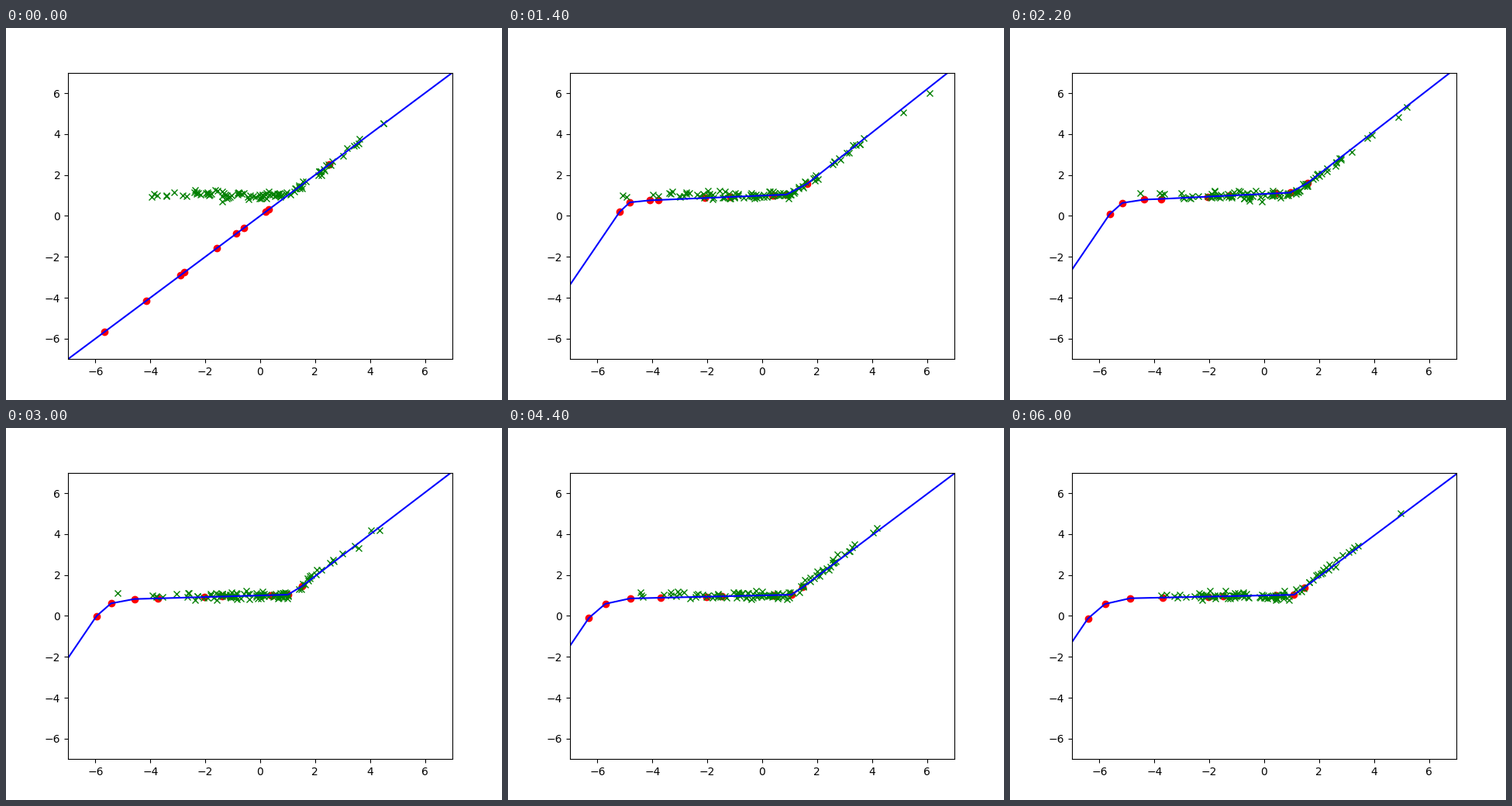
A matplotlib script for the animation above (6.2 s loop, 640 by 480 pixels).

```python
import numpy as np
import matplotlib.pyplot as plt
from matplotlib.animation import FuncAnimation

FRAMES, STEP_MS = 31, 200
SETTLED, LAST = 7, FRAMES - 1
LIMIT = 7
BATCH = 100

# Knot positions at the start, once the bend is learnt, and at the end
KNOTS = np.array([
    [-5.67, -4.14, -2.90, -2.76, -1.58, -0.87, -0.59, 0.20, 0.32, 2.52],
    [-5.19, -4.82, -4.08, -3.77, -2.09, -1.15, 0.38, 0.42, 0.88, 1.65],
    [-6.42, -5.80, -4.88, -3.70, -2.02, -1.50, 0.41, 0.43, 1.08, 1.46],
])

# Heights at the left edge, knots 1, 2, 3, 9, 10 and the right edge
ANCHORS = [0, 1, 2, 3, 9, 10, 11]
BENT = np.array([-3.37, 0.20, 0.66, 0.76, 1.04, 1.58, 7.25])
FINAL = np.array([-1.28, -0.13, 0.58, 0.86, 1.03, 1.38, 6.93])


def ease_out(u, power):
    return 1 - (1 - u) ** power


def mix(a, b, u):
    return a + (b - a) * u


def with_edges(x):
    return np.concatenate([[-LIMIT], x, [LIMIT]])


def fit(step):
    """Piecewise linear curve, from the identity to a flat part and a ramp."""
    if step < SETTLED:
        u = ease_out(step / SETTLED, 1.6)
        x = with_edges(mix(KNOTS[0], KNOTS[1], u))
        identity = with_edges(KNOTS[0])[ANCHORS]
        heights = mix(identity, BENT, u)
        return x, np.interp(x, x[ANCHORS], heights)

    u = (step - SETTLED) / (LAST - SETTLED)
    v = ease_out(u, 2.3)
    x = with_edges(mix(KNOTS[1], KNOTS[2], v))
    y = np.interp(x, x[ANCHORS], mix(BENT, FINAL, v))
    # The right side bounces while training goes on
    bounce = 0.05 * (1 - np.cos(6 * np.pi * u))
    return x, y + bounce * np.clip((x + 4) / 5, 0, 1)


def sample_batch(step):
    """Noisy samples of max(1, x)."""
    rng = np.random.default_rng(100 + step)
    x = rng.normal(0, 2, BATCH)
    return x, np.maximum(1, x) + rng.normal(0, 0.1, BATCH)


fig, ax = plt.subplots(figsize=(6.4, 4.8), dpi=100)
ax.set_xlim(-LIMIT, LIMIT)
ax.set_ylim(-LIMIT, LIMIT)
knots, = ax.plot([], [], "ro")
samples, = ax.plot([], [], "gx")
curve, = ax.plot([], [], "b-")


def update(step):
    x, y = fit(step)
    knots.set_data(x[1:-1], y[1:-1])
    samples.set_data(*sample_batch(step))
    curve.set_data(x, y)
    return knots, samples, curve


anim = FuncAnimation(fig, update, frames=FRAMES, interval=STEP_MS,
                     repeat=True, repeat_delay=0)
plt.show()
```
